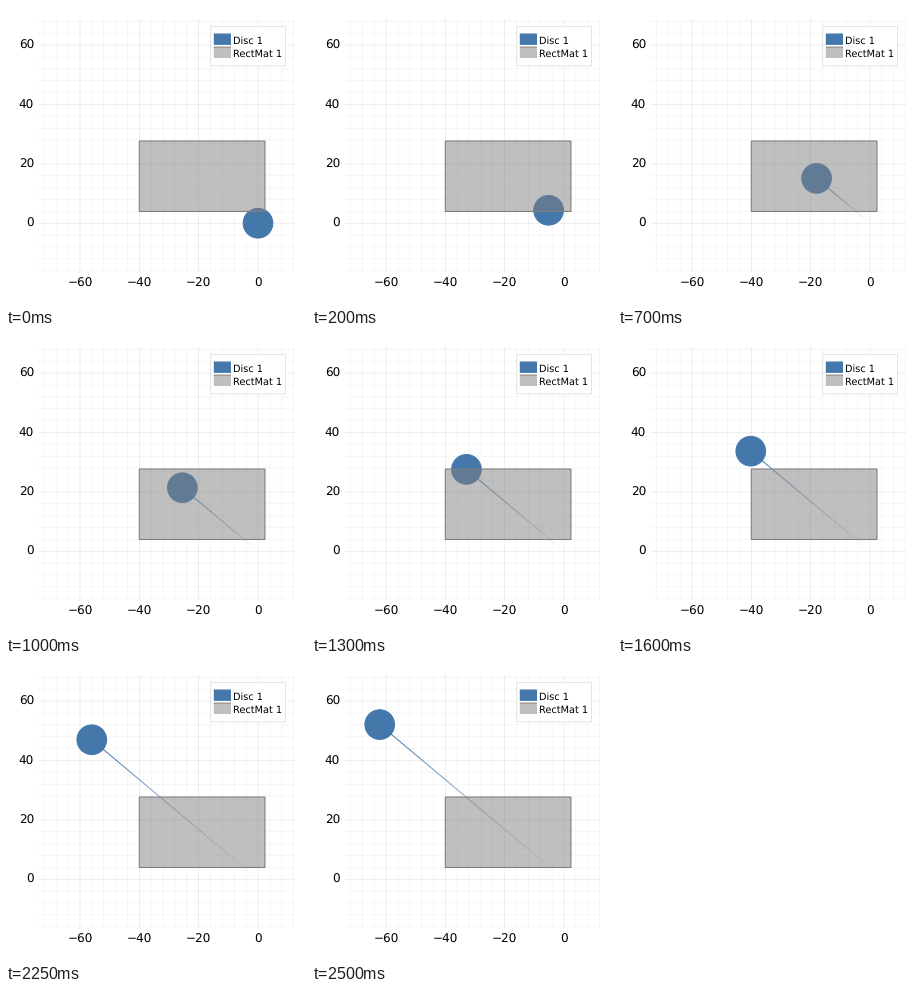
Recreate the animation shown at these times as a matplotlib script. Size 300 by 300 pixels, loop 2.55 s.

```python
import numpy as np
import matplotlib.pyplot as plt
from matplotlib.animation import FuncAnimation
from matplotlib.collections import LineCollection
from matplotlib.colors import to_rgba
from matplotlib.patches import Circle, Rectangle

plt.rcParams["text.hinting"] = "none"
plt.rcParams["path.snap"] = False

SIZE, DPI = 300, 100
FRAMES, INTERVAL = 51, 50
SCALE = 2.967                 # pixels per unit
ORIGIN = np.array([252.0, 217.2])
LEFT, RIGHT, TOP, BOTTOM = 33, 288, 13, 265
BLUE, GRAY = "#4477aa", "#808080"
PT = 72 / DPI                 # points per pixel

ANGLE = np.radians(140)
ENTER, LEAVE = 4, 26          # steps at which the disc meets and leaves the mat
FAST, SLOW = 1.695, 1.59      # units per step before and after the mat


def to_px(x, y):
    return ORIGIN + SCALE * np.array([x, -y])


def distance(k):
    """Constant speed, uniform braking on the mat, then constant speed again."""
    before = min(k, ENTER)
    on = np.clip(k - ENTER, 0, LEAVE - ENTER)
    after = max(k - LEAVE, 0)
    brake = (FAST - SLOW) / (LEAVE - ENTER)
    return FAST * before + FAST * on - brake * on**2 / 2 + SLOW * after


def position(k):
    d = distance(k)
    return to_px(d * np.cos(ANGLE), d * np.sin(ANGLE))


fig = plt.figure(figsize=(SIZE / DPI, SIZE / DPI), dpi=DPI, facecolor="white")
ax = fig.add_axes([0, 0, 1, 1])
ax.set_xlim(0, SIZE)
ax.set_ylim(SIZE, 0)
ax.axis("off")


def draw_grid():
    for v in range(-72, 72, 4):
        alpha = 0.1 if v % 20 == 0 else 0.05
        x, y = to_px(v, v)
        style = dict(color="black", alpha=alpha, lw=0.65 * PT, zorder=1)
        if LEFT <= x <= RIGHT:
            ax.plot([x, x], [TOP, BOTTOM], **style)
        if TOP <= y <= BOTTOM:
            ax.plot([LEFT, RIGHT], [y, y], **style)


def label(x, y, text, size, ha):
    ax.text(x, y, text, fontsize=size * PT, family="DejaVu Sans",
            ha=ha, va="baseline", color="black", zorder=9)


def draw_ticks():
    for v in (-60, -40, -20, 0):
        label(to_px(v, 0)[0], 280.7, str(v).replace("-", "\u2212"), 12, "center")
    for v in (0, 20, 40, 60):
        label(28, to_px(0, v)[1] + 4, str(v), 12, "right")


def draw_legend():
    ax.add_patch(Rectangle((204.7, 20.4), 74.8, 39.5, fc="white", ec="#e4e4e4",
                           lw=PT, zorder=7))
    rows = [("Disc 1", BLUE, BLUE, 28), ("RectMat 1", "#bfbfbf", GRAY, 41.1)]
    for text, fill, line, y in rows:
        ax.add_patch(Rectangle((207.8, y), 17.2, 10.9, fc=fill, lw=0, zorder=8))
        ax.plot([207.8, 225], [y, y], color=line, lw=PT,
                solid_capstyle="butt", zorder=8)
        label(226.6, y + 9.8, text, 9.8, "left")


draw_grid()
draw_ticks()
draw_legend()

trail = LineCollection([], linewidths=1.1 * PT, capstyle="butt", zorder=2)
ax.add_collection(trail, autolim=False)
disc = Circle(position(0), 5 * SCALE, fc=BLUE, ec=BLUE, lw=PT, zorder=3)
ax.add_patch(disc)

corner, far = to_px(-40, 3.95), to_px(2.35, 27.7)
for style in (dict(fc=GRAY, ec="none", alpha=0.5),
              dict(fc="none", ec=GRAY, lw=1.1 * PT)):
    ax.add_patch(Rectangle(corner, *(far - corner), zorder=4, **style))


def update(k):
    path = np.array([position(i) for i in range(k + 1)])
    colors = np.tile(to_rgba(BLUE), (k, 1))
    colors[:, 3] = np.linspace(0, 1, k)
    trail.set_segments(list(np.stack([path[:-1], path[1:]], axis=1)))
    trail.set_color(colors)
    disc.center = path[-1]
    return trail, disc


anim = FuncAnimation(fig, update, frames=FRAMES, interval=INTERVAL,
                     repeat=True, repeat_delay=0)
plt.show()
```
